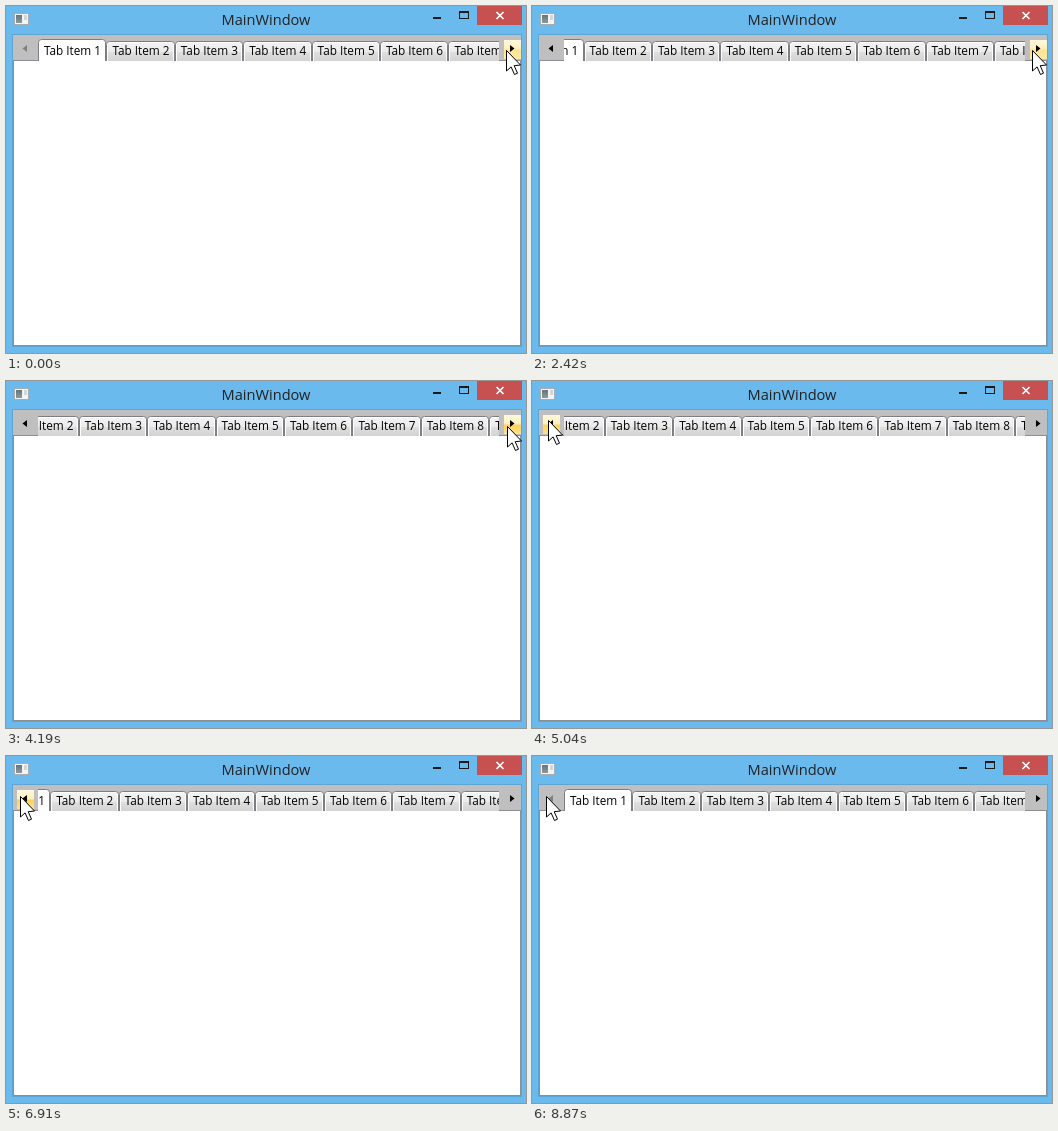
Animation of 520 by 347 pixels, one loop 9.48 s. Source, as an HTML page with a canvas:

```html
<!DOCTYPE html>
<html lang="en">
<head>
<meta charset="utf-8">
<title>Scrolling tabs</title>
<style>
html, body { margin: 0; width: 100%; height: 100%; overflow: hidden; background: #6bbaee; }
canvas { display: block; width: 520px; height: 347px; }
</style>
</head>
<body>
<canvas id="stage" width="520" height="347"></canvas>
<script>
const ctx = document.getElementById('stage').getContext('2d');
const LOOP = 9480;
const FONT = '"Open Sans", "Noto Sans", sans-serif';

// The picture advances in runs of even steps: start, end, number of steps.
const RUNS = [
  [380, 940, 8], [1080, 1950, 12], [2030, 2930, 13], [3030, 3410, 6], [3620, 4190, 8],
  [4410, 5350, 13], [5430, 6360, 13], [6580, 7450, 12], [7530, 8470, 12], [8540, 8870, 5]
];

// Each click presses a button; the strip then glides one line (16 px).
const RIGHT_CLICKS = [380, 1080, 1670, 2300, 2850, 3620];
const LEFT_CLICKS = [5190, 5800, 6580, 7150, 7720, 8310];
const PRESS = 80, GLIDE = 480, LINE = 16;

const PITCH = 68.4, VIEW_LEFT = 32, VIEW_RIGHT = 493;

const clamp01 = v => Math.max(0, Math.min(1, v));
const mix = (a, b, p) => a + (b - a) * p;

function stepped(t) {
  const run = RUNS.filter(r => r[0] <= t).pop();
  if (!run) return 0;
  const [start, end, count] = run;
  const step = (end - start) / (count - 1);
  return start + Math.min(count - 1, Math.floor((t - start) / step + 0.001)) * step;
}

function scrollOffset(t) {
  const travelled = clicks =>
    clicks.reduce((sum, c) => sum + LINE * clamp01((t - c - PRESS) / GLIDE), 0);
  return travelled(RIGHT_CLICKS) - travelled(LEFT_CLICKS);
}

// The pointer slows down on its way left and arcs upward near the end.
function cursorAt(t) {
  if (t < 3690) return [500, 44];
  const eased = Math.sin(clamp01((t - 4382) / 695) * Math.PI / 2);
  const lift = 15 * Math.sin(Math.PI * eased ** 6);
  return [Math.round(mix(501, 14, eased)), Math.round(mix(45, 40, eased) - lift)];
}

function rect(x, y, w, h, color) {
  ctx.fillStyle = color;
  ctx.fillRect(x, y, w, h);
}

function outline(x, y, w, h, color) {
  ctx.strokeStyle = color;
  ctx.lineWidth = 1;
  ctx.strokeRect(x + 0.5, y + 0.5, w - 1, h - 1);
}

function polygon(points, fill, stroke) {
  ctx.beginPath();
  points.forEach(([x, y]) => ctx.lineTo(x, y));
  ctx.closePath();
  ctx.fillStyle = fill;
  ctx.fill();
  if (stroke) {
    ctx.strokeStyle = stroke;
    ctx.lineWidth = 1;
    ctx.stroke();
  }
}

function verticalGradient(top, bottom, stops) {
  const g = ctx.createLinearGradient(0, top, 0, bottom);
  stops.forEach(([at, color]) => g.addColorStop(at, color));
  return g;
}

function text(label, x, y, size, align, color) {
  ctx.font = `${size}px ${FONT}`;
  ctx.textAlign = align;
  ctx.fillStyle = color;
  ctx.fillText(label, x, y);
}

function drawWindow() {
  rect(0, 0, 520, 347, '#6bbaee');

  rect(8, 7, 15, 12, '#f4f4f4');
  outline(8, 7, 15, 12, '#a3adb3');
  rect(10, 9, 6, 8, verticalGradient(9, 17, [[0, '#66757a'], [1, '#8d9a98']]));
  rect(18, 9, 3, 5, '#d2d6d8');

  text('MainWindow', 260, 19, 14.6, 'center', '#222');

  rect(427, 11, 8, 2, '#1a1a1a');
  outline(453, 5, 10, 8, '#1a1a1a');
  rect(453, 5, 10, 2, '#1a1a1a');

  rect(471, 0, 45, 19, '#c75050');
  ctx.strokeStyle = '#fff';
  ctx.lineWidth = 1.7;
  ctx.beginPath();
  ctx.moveTo(490.5, 6); ctx.lineTo(497.5, 13);
  ctx.moveTo(497.5, 6); ctx.lineTo(490.5, 13);
  ctx.stroke();

  rect(6, 28, 510, 27, '#bfbfbf');
  rect(7, 54, 508, 286, '#fff');
  outline(7, 54, 508, 286, '#8c8e94');
  outline(6, 28, 510, 313, '#5fa5d3');
}

function tabPath(left, top, right, radius) {
  ctx.beginPath();
  ctx.moveTo(left, 55);
  ctx.lineTo(left, top + radius);
  ctx.quadraticCurveTo(left, top, left + radius, top);
  ctx.lineTo(right - radius, top);
  ctx.quadraticCurveTo(right, top, right, top + radius);
  ctx.lineTo(right, 55);
}

function drawTab(index, offset) {
  const selected = index === 0;
  const x = VIEW_LEFT + 0.5 + index * PITCH - offset;
  const left = Math.floor(x) + 0.5;
  const right = Math.floor(x + PITCH) - 0.5;
  const top = selected ? 33.5 : 35.5;

  tabPath(left, top, right, 3);
  ctx.fillStyle = '#fff';
  ctx.fill();
  ctx.strokeStyle = '#7c7e83';
  ctx.lineWidth = 1;
  ctx.stroke();
  if (!selected) {
    tabPath(left + 1.5, top + 1.5, right - 1.5, 1);
    ctx.fillStyle = verticalGradient(36, 55,
      [[0, '#f3f3f3'], [0.5, '#ebebeb'], [0.51, '#dfdfdf'], [1, '#d3d3d3']]);
    ctx.fill();
  }
  text('Tab Item ' + (index + 1), x + 5.5, 49, 11.75, 'left', '#000');
}

function drawTabs(offset) {
  ctx.save();
  ctx.beginPath();
  ctx.rect(VIEW_LEFT, 29, VIEW_RIGHT - VIEW_LEFT, 26);
  ctx.clip();
  for (let i = 0; i < 9; i++) drawTab(i, offset);
  ctx.restore();
}

function drawScrollButton(x, tip, base, enabled, hovered, pale) {
  if (enabled && hovered) {
    const low = pale ? '#ffe28c' : '#ffd05a';
    rect(x, 34, 17, 19, verticalGradient(34, 53,
      [[0, '#fff8de'], [0.48, '#ffefbd'], [0.52, low], [1, pale ? '#ffeaa8' : '#ffe18c']]));
  }
  polygon([[tip, 42.5], [base, 39], [base, 46]], enabled ? '#000' : '#808080');
}

function drawCursor([x, y]) {
  const shape = [[0, 0], [0, 20.5], [4.6, 16.4], [8, 24], [11, 22.7], [7.7, 15.2], [14, 14.5]];
  polygon(shape.map(([dx, dy]) => [x + 0.5 + dx, y + 0.5 + dy]), '#fff', '#000');
}

function draw(t) {
  const cursor = cursorAt(t);
  const leftEnabled = t >= RIGHT_CLICKS[0] + PRESS && t < LEFT_CLICKS[5] + PRESS;
  const pale = t < RIGHT_CLICKS[0] ||
    [...RIGHT_CLICKS, ...LEFT_CLICKS].some(c => t >= c && t < c + 140);

  drawWindow();
  drawTabs(scrollOffset(t));
  drawScrollButton(11, 16.5, 21, leftEnabled, cursor[0] < 28, pale);
  drawScrollButton(498, 508.5, 504, true, cursor[0] >= 498, pale);
  drawCursor(cursor);
}

function frame() {
  draw(stepped(performance.now() % LOOP));
  requestAnimationFrame(frame);
}
frame();
</script>
</body>
</html>
```
